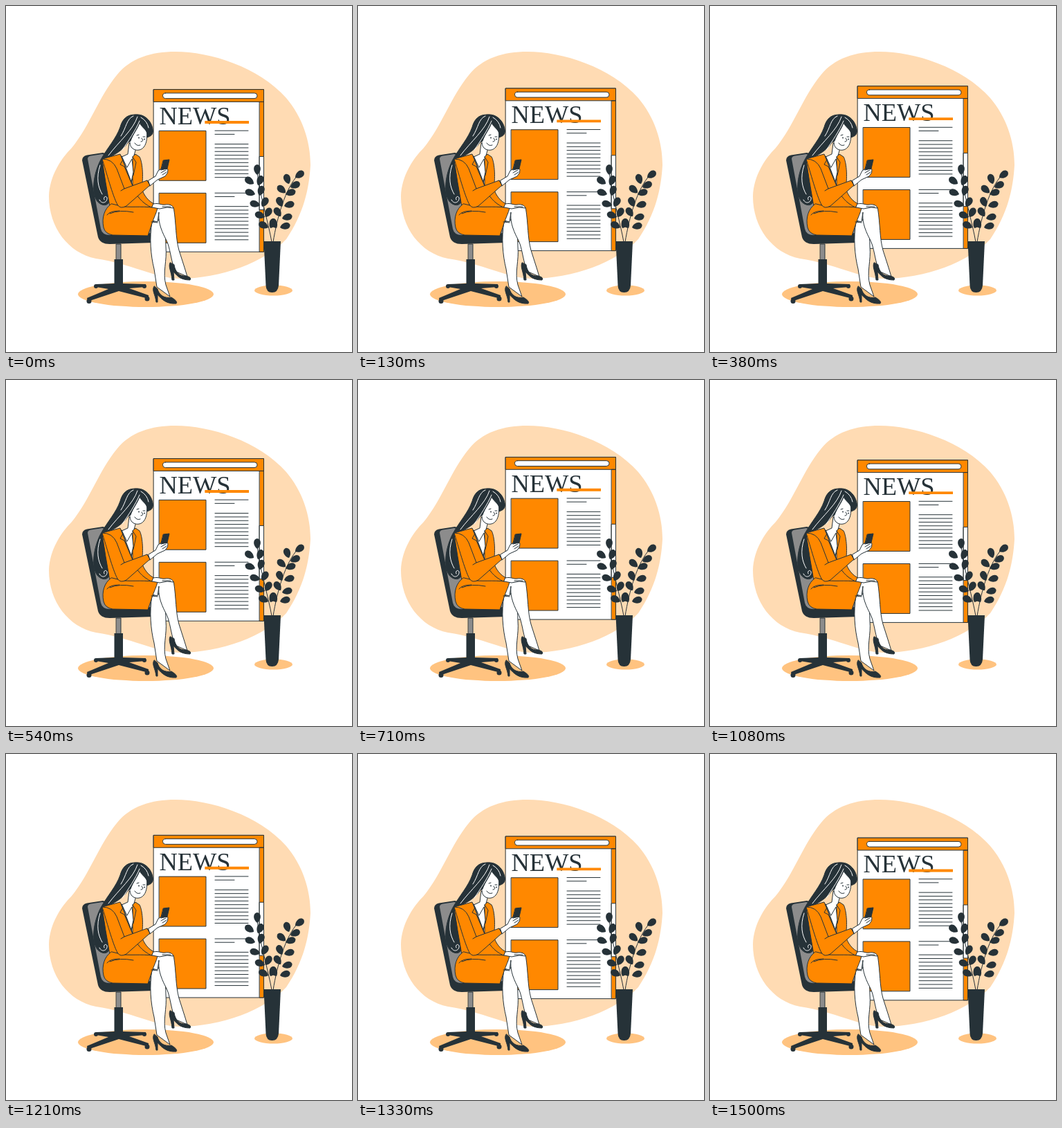
Animation of 500 by 500 pixels, one loop 1.54 s. Source, as an HTML page:

```html
<!DOCTYPE html>
<html lang="en">
<head>
<meta charset="utf-8">
<title>Reading the news</title>
<style>
  html, body { margin: 0; height: 100%; overflow: hidden; background: #fff; }
  svg { display: block; width: 100vw; height: 100vh; }
  .ink { fill: #263238; }
  .orange { fill: #ff8800; }
  .white { fill: #fff; }
  .gray { fill: #8c8c8c; }
  .line { fill: none; }
  .edge { stroke: #263238; stroke-width: 1; stroke-linejoin: round; stroke-linecap: round; }
  .shine { fill: none; stroke: #fff; stroke-width: 1; stroke-linecap: round; }
  text { font: 36.4px "Liberation Serif", Tinos, serif; }
</style>
</head>
<body>
<svg viewBox="0 0 500 500">
  <path fill="#ffdbb3" d="M245 66C295 66 365 88 405 133C428 160 440 195 440 230C438 265 430 300 405 337C375 370 310 394 250 394C215 393 180 372 130 365C90 357 62 320 62 275C63 245 80 220 95 205C120 175 135 130 160 100C180 75 210 66 245 66Z"/>
  <g fill="#ffc380">
    <ellipse cx="202" cy="416.5" rx="98" ry="18.5"/>
    <ellipse cx="386.5" cy="411" rx="27.5" ry="7.5"/>
  </g>

  <g id="page">
    <g class="edge">
      <path class="white" d="M213.5 121.2H372.5V355.8H213.5Z"/>
      <path class="orange" d="M213.5 121.2H372.5V139H213.5ZM366.5 139H372.5V355.8H366.5Z"/>
      <path class="white" d="M366.5 218H372.5V295H366.5Z"/>
      <rect class="white" x="226.5" y="126.4" width="136.5" height="7.8" rx="3.9"/>
      <path class="orange" d="M221.5 180.9H289V252.8H221.5ZM221.5 270.9H289V342.8H221.5Z"/>
      <path class="line" id="print"/>
    </g>
    <text class="ink" x="221.5" y="171.3">NEWS</text>
    <path class="orange" d="M287.3 166.6H351V170.5H287.3Z"/>
  </g>

  <g id="plant" class="ink">
    <path class="edge line" d="M384 341C379 312 367 275 363 240M386 341C392 305 403 265 422 244"/>
    <path d="M372.5 340H397L394 404Q393 414 384.500 414Q376 414 375.500 404Z"/>
  </g>

  <g id="chair">
    <path class="ink" d="M110 223Q110 217 117 215.500L140 212L150 215L158 316L215 325L214 342L150 344Q136 344 133 334Z"/>
    <path class="gray" d="M118 221Q118 217 123 216.500L139 214L148 217L157 315L212 321V328L150 331Q139 331 137 322Z"/>
    <path class="gray edge" d="M159.500 344H166V367H159.500Z"/>
    <path class="ink" d="M156.500 366H169V401L202 402V406L178 408L206 418V423L163 412L118 427L117 422L148 409L130 406V402L156.500 401Z"/>
    <g class="ink">
      <circle cx="130" cy="405" r="3"/><circle cx="120" cy="426.500" r="3.500"/>
      <circle cx="200" cy="405" r="3"/><circle cx="204" cy="423" r="3.500"/>
    </g>
  </g>

  <g id="woman" class="edge">
    <path class="white" d="M211 312C207 335 209 360 214 380L218 406L237 420L231 403C226 385 233 368 231 348L230 308Z"/>
    <path class="white" d="M216 294C225 287 240 284 242.500 293C246 315 245 335 250 353L258 378L262 391L246 384L241 373C237 357 236 346 231 337C222 320 220 309 221 298L219 312L211 310Z"/>
    <path class="ink" d="M237 371C234 377 239 383 240 396H243L242 384C248 391 253 396 266 396Q269 392 260 390C250 391 244 383 243 374Z"/>
    <path class="ink" d="M214 405C210 411 216 417 217 428H219L219 417C225 424 232 431 246 430Q249 427 239 421C228 423 221 417 219 409Z"/>

    <path class="ink" d="M186 157C174 157 168 164 165 175C159 192 147 204 137 222C126 243 124 268 130 279C134 288 146 291 149 283C150 272 145 258 142 240L148 219C162 213 172 205 179 193L200 176Z"/>
    <path class="white" d="M178 198L176 214L165 219L180 258L186 240L184 219L187 209Z"/>
    <path class="white" d="M182 178C179 190 177 200 182 205C187 210 195 209 199 204C204 198 204 188 204 178L191 165Z"/>
    <path class="ink" d="M186 157C203 155 212 170 212.500 181C212 188 206 189 203.500 190C206 179 198 178 193 169C190 178 184 184 180 195L174 198L176 172Z"/>
    <path class="shine" d="M190 160C184 179 163 196 148 216M184 159C174 163 174 176 166 188M193 166C187 180 177 195 168 208M136 230C130 248 133 262 139 272M135 280C139 288 147 283 146 277C144 273 140 277 142 280M195 161Q204 166 206 176"/>
    <path class="line" d="M186 198Q189 203 194 201M196 191Q200 196 195 196M189 187L192 186M198 189L201 189"/>
    <circle class="ink" cx="192" cy="190.500" r=".6"/><circle class="ink" cx="200" cy="192.500" r=".6"/>

    <path class="orange" d="M139 221L165 214L171 229L183 259L183 218L187 214L193 218C197 225 199 246 196 263C199 274 206 282 214 286L211 291L180 292L150 290L144 255Z"/>
    <path class="white" d="M167 217L181 254L184 240L182 221L175 233Z"/>
    <path class="line" d="M169 222L165 229L171 232L183 260M183 218L188 226L184 245M185 262C187 274 197 285 210 291"/>
    <path class="orange" d="M152 286C142 293 138 306 141 320Q143 329 154 331L205 332L211 314C214 305 217 300 219 292C202 289 184 291 170 290Z"/>
    <path class="line" d="M146 302Q150 296 164 296M150 300Q164 294 184 298M210 312L219 313"/>
    <path class="white" d="M213 286C221 284 224 288 230 287C238 286 241 289 242 292L233 291L222 293L211 291Z"/>
    <path class="line" d="M226 290L238 290"/>
    <path class="white" d="M206 252L216 246L220 238L226 234L234 236Q235 241 230 246L219 251L208 260Z"/>
    <path class="ink" d="M227.500 223L236 222L233 235L224 237Z"/>
    <path class="line" d="M224 241L231 237M226 244L232 240"/>
    <path class="orange" d="M139 221C145 240 154 274 161 287Q165 294 174 289L208 259L204 252L171 264L160 235Q154 221 139 221Z"/>
    <path class="line" d="M171 264L166 267M204 252L208 259"/>
  </g>
</svg>
<script>
const svgNS = "http://www.w3.org/2000/svg";
const page = document.getElementById("page");
const plant = document.getElementById("plant");

// Two articles: a two-line heading and ten lines of print
let print = "";
for (const top of [180.7, 270.8]) {
  print += `M302 ${top}H350M302 ${top + 5.2}H330`;
  for (let row = 0; row < 10; row++) print += `M302 ${top + 19.4 + row * 5.35}H350`;
}
document.getElementById("print").setAttribute("d", print);

// Leaves: base x, base y, tilt in degrees
const leaves = [
  [363, 244, 0], [358, 257, -55], [364, 259, 25], [360, 272, -72], [366, 274, 18],
  [367, 288, -75], [370, 290, 30], [374, 305, -70], [375, 305, 30], [379, 320, -65], [382, 321, 25],
  [418, 248, 55], [409, 257, -20], [411, 262, 65], [404, 270, -50], [404, 272, 72],
  [399, 290, -25], [402, 289, 75], [397, 304, -35], [399, 307, 75], [391, 321, -30], [396, 320, 75]
];
for (const [x, y, tilt] of leaves) {
  const leaf = document.createElementNS(svgNS, "path");
  leaf.setAttribute("d", "M0 0C6-4 7-14 0-15C-7-14-6-4 0 0Z");
  leaf.setAttribute("transform", `translate(${x} ${y}) rotate(${tilt})`);
  plant.append(leaf);
}

// The page floats up 10 units and back at a constant speed, in discrete steps
const LOOP = 1540, STEPS = 37, RISE = 10;
function draw() {
  const time = performance.now() % LOOP;
  const step = Math.floor(time * STEPS / LOOP + 0.1);
  const phase = (step + 1) / STEPS % 1;
  const lift = RISE * (1 - Math.abs(1 - 2 * phase));
  page.setAttribute("transform", `translate(0 ${-lift})`);
  requestAnimationFrame(draw);
}
draw();
</script>
</body>
</html>
```
